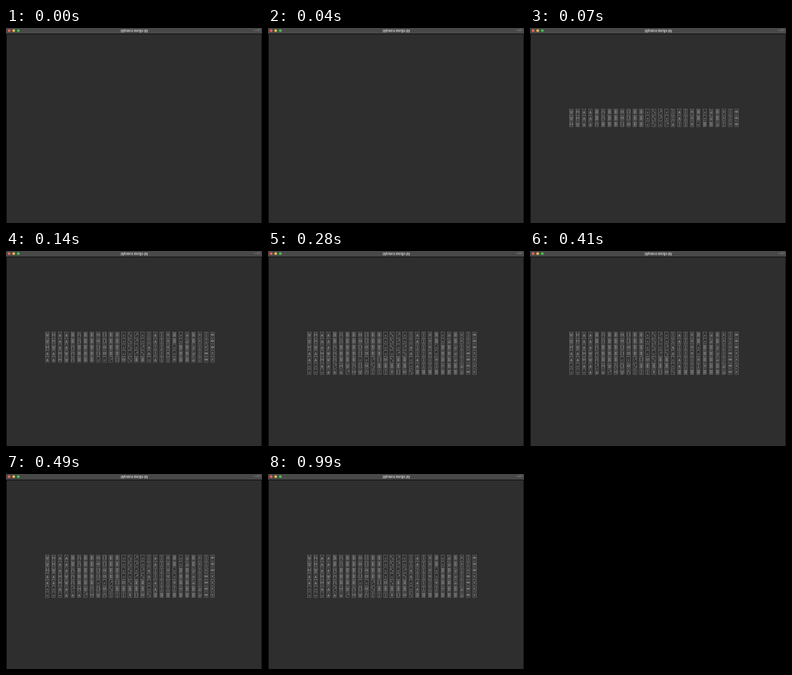
Write an HTML page with a canvas that moves like this. It is 320 by 244 pixels and loops after 1.33 s.

```html
<!DOCTYPE html>
<html lang="en">
<head>
<meta charset="utf-8">
<title>python3 merge.py</title>
<style>
html, body { margin: 0; height: 100%; overflow: hidden; background: #2e2e2e; }
canvas { display: block; }
</style>
</head>
<body>
<canvas id="stage" width="320" height="244"></canvas>
<script>
const ctx = document.getElementById('stage').getContext('2d');
const LOOP = 1330;
const REVEALS = [[280, 7], [210, 6], [140, 5], [70, 3], [0, 0]]; // [from ms, visible rows]
const START = [...'WHAAGVGGOBGGa\\/aIAINGaZGXIE'];

// Tile faces in ascending sort order, drawn inside a 5 x 7 tile.
const FACES = {
  a: 'M2.5 3.2v1.8M1.7 4.6h1.6',
  A: 'M2.5 1.8v3.6M1.5 5.2L2.5 3L3.5 5.2Z',
  '/': 'M1.3 5L3.8 2M3 2h1v1',
  H: 'M1.3 1.3v4.4M3.7 1.3v4.4M1 3.5h3',
  W: 'M1 1.5v2.5h3v-2.5M2.5 1.5v4M1 5.5h3',
  V: 'M1 5.7L2.1 1.3M4 5.7L2.9 1.3',
  I: 'M2.5 1.2v4.6M2 1.5h1M2 5.5h1',
  N: 'M2 1.4v4.2M3 1.4v4.2M1.5 3.5h2',
  B: 'M2 1.5h-.8v4h.8M3 1.5h.8v4h-.8',
  O: 'M1.2 2h2.6v3h-2.6zM1.2 3.5h2.6',
  '\\': 'M1.2 1.5L3.8 5.5M1 2.2h1M3 4.8h1',
  G: 'M1 1.7h3M1 3.5h3M1 5.3h3M1.8 1.3v4.4M3.2 1.3v4.4',
  Z: 'M1 1.5L4 2.8M1 4h3M1 5.4h3M2.5 3.5v2',
  E: 'M.6 3.5L2.5 2L4.4 3.5L2.5 5ZM1.2 3.2h2.6M1.2 3.8h2.6',
  X: 'M1.2 1.7L3.8 5.3M3.8 1.7L1.2 5.3'
};
const ORDER = Object.keys(FACES);
const paths = Object.fromEntries(ORDER.map(k => [k, new Path2D(FACES[k])]));

function mergePass(list, width) {
  const out = [];
  for (let i = 0; i < list.length; i += width)
    out.push(...list.slice(i, i + width).sort((p, q) => ORDER.indexOf(p) - ORDER.indexOf(q)));
  return out;
}

const rows = [START, START];
for (let width = 2; width <= 32; width *= 2) rows.push(mergePass(rows.at(-1), width));

function rect(color, x, y, w, h) {
  ctx.fillStyle = color;
  ctx.fillRect(x, y, w, h);
}

// Fonts are set ten times larger and scaled down, for smooth tiny text.
function label(text, x, font, color, align) {
  ctx.save();
  ctx.translate(x, 3.4);
  ctx.scale(0.1, 0.1);
  ctx.font = font;
  ctx.fillStyle = color;
  ctx.textAlign = align;
  ctx.textBaseline = 'middle';
  ctx.fillText(text, 0, 0);
  ctx.restore();
}

function drawWindow() {
  rect('#2e2e2e', 0, 0, 320, 244);
  rect('#484848', 0, 0, 320, 7);
  rect('#151515', 0, 7, 320, 1);
  rect('#0c0c0c', 0, 7, 1, 237);
  rect('#181818', 319, 7, 1, 237);
  ['#f0625a', '#f0b840', '#3fc455'].forEach((color, i) => {
    ctx.fillStyle = color;
    ctx.beginPath();
    ctx.arc(3.9 + i * 5.75, 3.3, 1.7, 0, 7);
    ctx.fill();
  });
  label('python3 merge.py', 160.5, 'bold 38px Inter, sans-serif', '#d4d4d4', 'center');
  label('⌥⌘1', 318.5, '34px "DejaVu Sans", sans-serif', '#909090', 'right');
}

function drawTile(face, x, y) {
  ctx.save();
  ctx.translate(x, y);
  ctx.lineWidth = 0.5;
  ctx.strokeStyle = '#747474';
  ctx.strokeRect(0.3, 0.2, 4.4, 6.6);
  ctx.strokeStyle = '#a4a4a4';
  ctx.stroke(paths[face]);
  ctx.restore();
}

function frame(now) {
  const t = now % LOOP;
  const visible = REVEALS.find(([from]) => t >= from)[1];
  drawWindow();
  rows.slice(0, visible).forEach((row, r) =>
    row.forEach((face, c) => drawTile(face, 49.2 + c * 7.94, 101.3 + r * 7.75)));
  requestAnimationFrame(frame);
}
requestAnimationFrame(frame);
</script>
</body>
</html>
```
